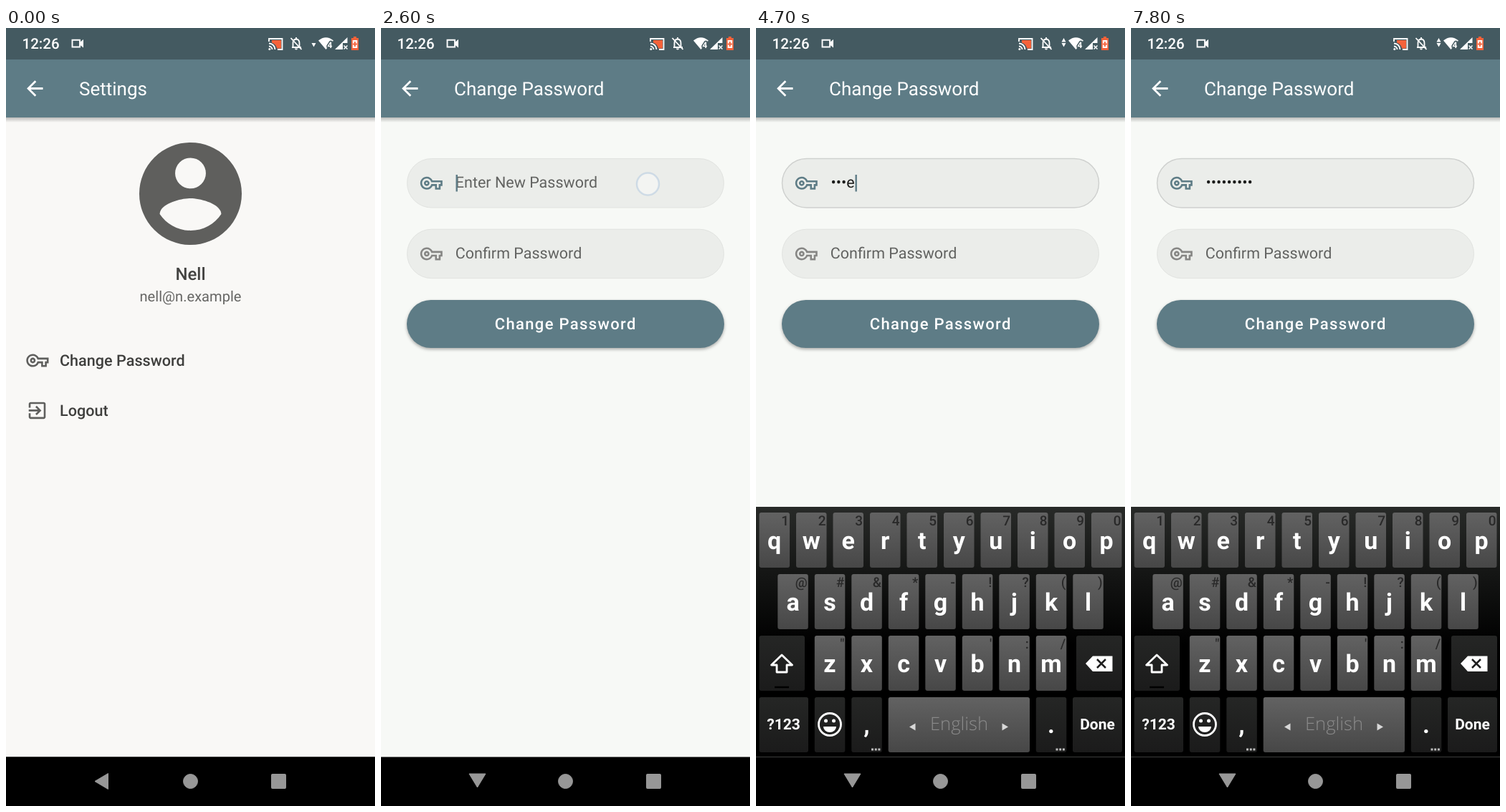
An HTML page for the animation above (8 s loop, 515 by 1087 pixels).

```html
<!DOCTYPE html>
<html lang="en">
<head>
<meta charset="utf-8">
<title>Change password</title>
<style>
  html, body { margin: 0; width: 100%; height: 100%; overflow: hidden; background: #000; }
  svg { display: block; width: 100%; height: 100%; font-family: Roboto, sans-serif; text-rendering: geometricPrecision; }
  .title { font-size: 26px; fill: #fff; }
  .item { font-size: 21.6px; font-weight: 500; fill: #3f3f3d; }
  .hint { font-size: 21.5px; fill: #626361; }
  .letter { font-size: 34px; font-weight: 700; fill: #fff; text-anchor: middle; }
  .alt { font-size: 19px; font-weight: 500; fill: #292929; text-anchor: end; }
  .word { font-size: 21px; font-weight: 700; fill: #fff; text-anchor: middle; }
  .button { filter: drop-shadow(0 2px 2px rgba(0,0,0,.32)); }
</style>
</head>
<body>
<svg viewBox="0 0 515 1087" preserveAspectRatio="none">
  <defs>
    <linearGradient id="shade" x2="0" y2="1"><stop stop-opacity=".24"/><stop offset="1" stop-opacity="0"/></linearGradient>
    <linearGradient id="board" x2="0" y2="1"><stop stop-color="#282a28"/><stop offset=".55" stop-color="#000"/></linearGradient>
    <linearGradient id="light" x2="0" y2="1"><stop stop-color="#626262"/><stop offset="1" stop-color="#474747"/></linearGradient>
    <linearGradient id="dark" x2="0" y2="1"><stop stop-color="#252625"/><stop offset="1" stop-color="#1b1b1b"/></linearGradient>
    <clipPath id="screen"><path d="M0 0H515V1018.5H0z"/></clipPath>
    <path id="key" d="M22 19h-6v-4h-2.68c-1.14 2.42-3.6 4-6.32 4-3.86 0-7-3.14-7-7s3.14-7 7-7c2.72 0 5.17 1.58 6.32 4H24v6h-2v4zm-4-2h2v-4h2v-2H11.94l-.23-.67C11.01 8.34 9.11 7 7 7c-2.76 0-5 2.24-5 5s2.24 5 5 5c2.11 0 4.01-1.34 4.71-3.33l.23-.67H18v4zM7 15c-1.65 0-3-1.35-3-3s1.35-3 3-3 3 1.35 3 3-1.35 3-3 3zm0-4c-.55 0-1 .45-1 1s.45 1 1 1 1-.45 1-1-.45-1-1-1z"/>
    <g id="bar">
      <rect y="125" width="515" height="7" fill="url(#shade)"/>
      <rect width="515" height="125" fill="#5e7c86"/>
      <path transform="translate(23.5 67.7) scale(1.4)" fill="#fff" d="M20 11H7.83l5.59-5.59L12 4l-8 8 8 8 1.41-1.41L7.83 13H20v-2z"/>
    </g>
  </defs>

  <g clip-path="url(#screen)">
    <g id="settings">
      <rect width="515" height="1019" fill="#f9f8f6"/>
      <use href="#bar"/>
      <text class="title" x="102" y="94">Settings</text>
      <g fill="#5f5f5d">
        <path fill-rule="evenodd" transform="translate(171.7 145.7) scale(7.15)" d="M12 2a10 10 0 1 0 0 20 10 10 0 1 0 0-20zm0 3a3 3 0 1 1 0 6 3 3 0 1 1 0-6zm0 14.2c-2.5 0-4.71-1.28-6-3.22.03-1.99 4-3.08 6-3.08 1.99 0 5.97 1.09 6 3.08-1.29 1.94-3.5 3.22-6 3.22z"/>
        <use href="#key" transform="translate(28.3 448.9) scale(1.3)"/>
        <path transform="translate(27.8 518.7) scale(1.31)" d="M10.09 15.59L11.5 17l5-5-5-5-1.41 1.41L12.67 11H3v2h9.67l-2.58 2.59zM19 3H5c-1.11 0-2 .9-2 2v4h2V5h14v14H5v-4H3v4c0 1.1.89 2 2 2h14c1.1 0 2-.9 2-2V5c0-1.1-.9-2-2-2z"/>
      </g>
      <text x="257.5" y="352" text-anchor="middle" font-size="24" font-weight="500" fill="#434341">Nell</text>
      <text x="257.5" y="382" text-anchor="middle" font-size="20.1" fill="#666664">nell@n.example</text>
      <text class="item" x="75" y="471.5">Change Password</text>
      <text class="item" x="75" y="541.5">Logout</text>
    </g>

    <g id="form">
      <rect width="515" height="1019" fill="#f7f9f6"/>
      <use href="#bar"/>
      <text class="title" x="102" y="94">Change Password</text>
      <rect id="field" x="36.5" y="182.5" width="442" height="68.5" rx="34.2" fill="#ebedea"/>
      <rect x="36.5" y="281.2" width="442" height="68.5" rx="34.2" fill="#ebedea" stroke="#e1e3e0"/>
      <use id="fieldKey" href="#key" transform="translate(54.8 201.3) scale(1.29)"/>
      <use href="#key" transform="translate(54.8 300) scale(1.29)" fill="#868684"/>
      <text id="hint" class="hint" x="103.8" y="223">Enter New Password</text>
      <text class="hint" x="103.8" y="322">Confirm Password</text>
      <text id="entry" x="104.5" y="223" font-size="21.5" fill="#1b1c1b"></text>
      <rect id="caret" y="205" width="2.4" height="23.5" fill="#5e7c86"/>
      <rect class="button" x="36" y="380" width="443" height="67" rx="33.5" fill="#5e7c86"/>
      <text x="158.8" y="421" font-size="22" font-weight="500" letter-spacing="1.33" fill="#fff">Change Password</text>
    </g>

    <g id="keyboard">
      <g id="strip">
        <rect y="611.5" width="515" height="58" fill="#262826"/>
        <path d="M183 619V664M331.500 619V664" stroke="#1b1d1b" stroke-width="1.5"/>
        <g fill="none" stroke="#d5d5d5" stroke-width="2">
          <path d="M17 637a9.500 9.500 0 0 1 17-3M35 644a9.500 9.500 0 0 1-17 3M17 629v6h5M35 652v-6h-5"/>
          <path d="M21.500 637.500V636h9v1.500M26 636v9M23.500 645.500h5" stroke-width="1.8"/>
          <path d="M487.500 639v2a9.500 9.500 0 0 0 19 0v-2M497 651v5" stroke="#eee" stroke-width="2.5"/>
        </g>
        <rect x="492.500" y="626" width="9" height="20" rx="4.500" fill="#eee"/>
      </g>
      <rect y="669" width="515" height="350" fill="url(#board)"/>
      <g id="keys"></g>
      <g fill="none" stroke="#fff" stroke-width="2.800">
        <path d="M36 876L21.500 890H29V900H43V890H50.500z" stroke-linejoin="round"/>
        <circle cx="103" cy="973" r="15.500"/>
      </g>
      <path d="M26 921H46" stroke="#000" stroke-width="2.500"/>
      <path d="M470 877.500H497.500V899H470L460 888z" fill="#fff"/>
      <path d="M476 882l12 12M488 882l-12 12" stroke="#1f1f1f" stroke-width="2.500"/>
      <g fill="#fff">
        <circle cx="97.500" cy="968" r="2.500"/><circle cx="108.500" cy="968" r="2.500"/>
        <path d="M94 976h18a9 8 0 0 1-18 0z"/>
        <path d="M222.500 971.500v10l-8.500-5zM343.500 971.500v10l8.500-5z" fill="#d8d8d8"/>
        <path id="dots" d="M161 1006.500h3v3h-3zM165.700 1006.500h3v3h-3zM170.400 1006.500h3v3h-3z" fill="#bbb"/>
        <use href="#dots" x="257.500"/>
      </g>
      <text x="283.500" y="981" text-anchor="middle" font-family="Open Sans, sans-serif" font-size="25.500" font-weight="300" fill="#8b8b8b">English</text>
    </g>
  </g>

  <g id="status" fill="#fff">
    <rect width="515" height="44" fill="#000" fill-opacity=".27"/>
    <text x="22.500" y="29" font-size="20.500" font-weight="500">12:26</text>
    <path d="M92.500 16.800h10.500v9.700H92.500z" fill="none" stroke="#fff" stroke-width="1.900"/>
    <path d="M103 20l5-4v11.500l-5-4z"/>
    <g id="tray">
      <path d="M371 17h13v11.500h-6q-1-6-7-8z" fill="#f4623a"/>
      <path d="M367 19v-4h18.500v15H379M367 21.500a8.500 8.500 0 0 1 8.500 8.500M367 25.500a4.500 4.500 0 0 1 4.500 4.500" fill="none" stroke="#fff" stroke-width="1.800"/>
      <circle cx="367.800" cy="29.500" r="1.500"/>
      <path d="M399 27h13M400.500 27v-6q0-5 4.500-5.500 4.500.5 4.500 5.500v6M405 13v2" fill="none" stroke="#fff" stroke-width="1.800"/>
      <path d="M403 28.500h4a2 2 0 0 1-4 0z"/>
      <path d="M397.500 14L412.500 30" stroke="#fff" stroke-width="1.800"/>
    </g>
    <path id="up" d="M426.500 19.500l3-5.500 3 5.500z"/>
    <path id="down" d="M426.500 21l3 5.500 3-5.500z"/>
    <path d="M436 17.500Q446.500 9 457 17.500L446.500 30z"/>
    <text x="448.500" y="27.500" font-size="12" font-weight="700" stroke="#465b61" stroke-width="3" paint-order="stroke">4</text>
    <path d="M476.500 13V21H470V30H459z"/>
    <path d="M471.500 24.500l5 5M476.500 24.500l-5 5" stroke="#fff" stroke-width="1.500"/>
    <path d="M485 12h4v2h3v17h-10V14h3z" fill="#f4623a"/>
    <path d="M483.800 17h6.500v11h-6.500z"/>
    <path d="M487 19v7M484 22.500h6" stroke="#f4623a" stroke-width="1.800"/>
  </g>

  <rect y="1018.500" width="515" height="69"/>
  <g fill="#979797" stroke="#979797" stroke-linejoin="round">
    <path id="back"/>
    <circle cx="257.500" cy="1052.500" r="10"/>
    <rect x="370.500" y="1042.500" width="20" height="20" rx="1"/>
  </g>
  <circle id="touch" r="15.500" fill="#fff" fill-opacity=".4" stroke="#b3c8df" stroke-opacity=".55" stroke-width="2.500"/>
</svg>

<script>
const $ = id => document.getElementById(id);
const set = (el, attrs) => Object.entries(attrs).forEach(([k, v]) => el.setAttribute(k, v));
const LOOP = 8000, STEP = 100, PITCH = 51.5;

function add(tag, attrs, text = '') {
  const el = document.createElementNS('http://www.w3.org/2000/svg', tag);
  set(el, attrs);
  el.textContent = text;
  $('keys').append(el);
}

const cap = (x, y, width, fill) => add('rect', { x, y, width, height: 77, rx: 3, fill: `url(#${fill})` });

// Letter rows: first key's left edge, letters, corner symbols.
const keyCentre = {};
[[4.5, 'qwertyuiop', '1234567890'], [30.3, 'asdfghjkl', '@#&*-!?()'], [81.8, 'zxcvbnm', '"   \':/']]
  .forEach(([left, letters, alts], row) => [...letters].forEach((letter, i) => {
    const x = left + i * PITCH, y = 677 + row * 86;
    cap(x, y, 42.5, 'light');
    add('text', { class: 'alt', x: x + 41.5, y: y + 18 }, alts[i]);
    add('text', { class: 'letter', x: x + 21.2, y: y + 51 }, letter);
    keyCentre[letter] = [x + 20, y + 41];
  }));

cap(4.5, 849, 63.5, 'dark');
cap(447, 849, 64, 'dark');
[[4.5, 68.5], [81.8, 42.5], [133.3, 42.5], [390.8, 42.5], [442, 69]].forEach(([x, w]) => cap(x, 935, w, 'dark'));
cap(184.7, 935, 197.3, 'light');
[['word', 38.5, 980, '?123'], ['word', 476.5, 980, 'Done'], ['letter', 154.5, 985, ','], ['letter', 412, 985, '.']]
  .forEach(([cls, x, y, text]) => add('text', { class: cls, x, y }, text));

// Each stroke: key, press time, time the character appears.
const strokes = [['c', 3400, 3500], ['o', 3800, 3900], ['d', 4200, 4300], ['e', 4500, 4600],
  ['x', 4900, 5000], ['p', 5200, 5300], ['a', 5500, 5600], ['s', 5900, 6000], ['s', 6200, 6200]];
const MASK_AT = 7700;
const touches = [
  { from: 900, to: 1200, at: [205, 465] },
  { from: 2400, to: 2700, at: [372.5, 218] },
  ...strokes.map(([letter, from, shown]) => ({ from, to: Math.max(shown, from + 100) + 100, at: keyCentre[letter] })),
];

const timing = { duration: 300, fill: 'both' };
const pageIn = [
  $('form').animate([{ transform: 'translateY(250px)' }, { transform: 'none' }], { ...timing, easing: 'cubic-bezier(.4,0,.2,1)' }),
  $('form').animate([{ opacity: 0 }, { opacity: 1 }], { ...timing, easing: 'ease-in' }),
];
pageIn.forEach(a => a.pause());

// Caret opacity keys: each holds until the next.
const caretKeys = [[0, 0], [2500, 1], [3200, 0], [3400, 1], [6700, .5], [6800, 0], [7200, .5], [7300, 1], [7700, .5], [7800, 0]];
const held = (keys, t) => keys.filter(([at]) => at <= t).pop()[1];
const show = (id, on) => set($(id), { visibility: on ? 'visible' : 'hidden' });

function render(t) {
  pageIn.forEach(a => { a.currentTime = Math.min(300, Math.max(0, t - 1255)); });

  const focused = t >= 2500;
  set($('field'), { stroke: t >= 2700 ? '#cfd1cf' : '#e1e3e0', 'stroke-width': t >= 2700 ? 1.5 : 1 });
  set($('fieldKey'), { fill: focused ? '#5e7c86' : '#868684' });
  set($('hint'), { opacity: Math.min(1, Math.max(0, (3700 - t) / 200)) });

  const typed = strokes.filter(([, , shown]) => shown <= t).map(([letter]) => letter);
  const masked = t >= MASK_AT ? typed.length : typed.length - 1;
  $('entry').textContent = typed.map((letter, i) => i < masked ? '•' : letter).join('');
  const length = typed.length ? $('entry').getComputedTextLength() + .8 : 0;
  set($('caret'), { x: 104.5 + length, opacity: held(caretKeys, t) });

  const rise = Math.min(1, Math.max(0, (t - 2600) / 400));
  show('keyboard', rise > 0);
  set($('keyboard'), { transform: `translate(0 ${406 * (1 - rise) ** 3})` });
  $('strip').style.display = t < 3600 ? '' : 'none';

  const sending = t >= 4000, receiving = t < 1700 || sending;
  show('up', sending);
  show('down', receiving);
  set($('tray'), { transform: `translate(${receiving ? 0 : 9} 0)` });
  set($('back'), { d: t >= 2600 ? 'M123 1042H146L134.5 1061z' : 'M124 1052.5L142.500 1041.500V1063.500z' });

  const touch = touches.find(p => t >= p.from && t < p.to);
  show('touch', touch);
  if (touch) set($('touch'), { cx: touch.at[0], cy: touch.at[1] });
}

const start = performance.now();
function tick() {
  const t = (performance.now() - start) % LOOP;
  render(Math.floor(t / STEP) * STEP);
  requestAnimationFrame(tick);
}
tick();
</script>
</body>
</html>
```
